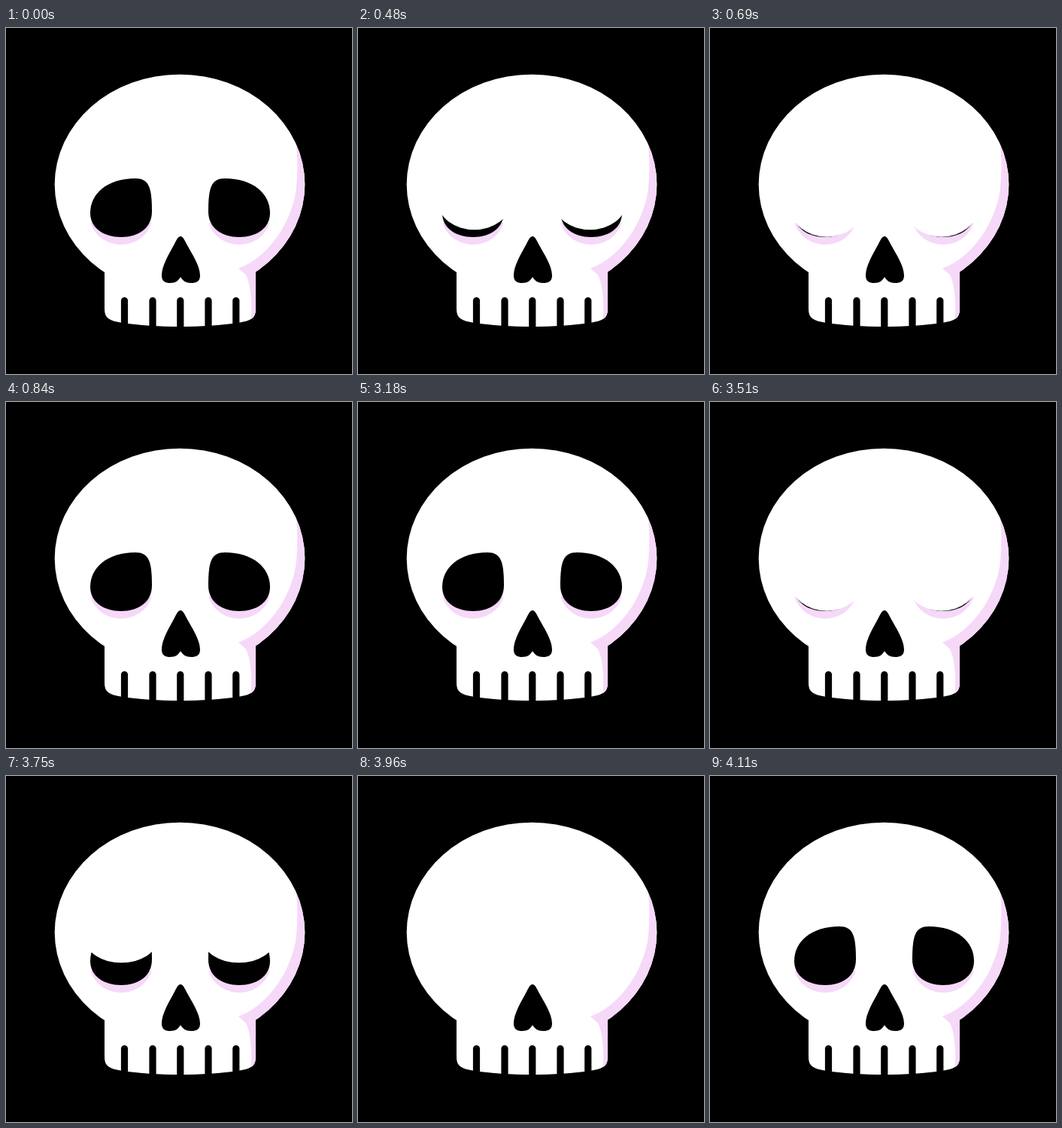
An HTML page with a canvas that plays this animation: 460 by 460 pixels, repeating every 4.5 s.

```html
<!DOCTYPE html>
<html lang="en">
<head>
<meta charset="utf-8">
<title>Blinking skull</title>
<style>
  html, body { margin: 0; width: 100%; height: 100%; overflow: hidden; background: #000; }
  canvas { display: block; width: 460px; height: 460px; }
</style>
</head>
<body>
<canvas id="stage" width="460" height="460"></canvas>
<script>
const ctx = document.getElementById('stage').getContext('2d');

const LOOP = 4500, STEP = 30;
const BONE = '#fff', SHADE = '#f6d8f9', DARK = '#000';

// Blink starts and phases, counted in steps of 30 ms
const BLINKS = [12, 106, 121.9];
const SHUT = 6, REOPEN = 9.6, DONE = 15.2;

const skull = new Path2D();
skull.ellipse(231, 208, 166.3, 146.3, 0, 0, Math.PI * 2);
skull.addPath(new Path2D(
  'M131 312 H332 V374 C332 386 325 389 311 391.5 C285 395.5 260 397 231.5 397 ' +
  'C203 397 178 395.5 152 391.5 C138 389 131 386 131 374 Z'));

const headShade = new Path2D(
  'M384.5 147 C388 167 388 190 386 212 C381 258 348 306 309 319.5 ' +
  'L332 340 L420 300 V147 Z');
const jawShade = new Path2D(
  'M309 319.5 C319.5 322 323.5 338 325 352 C326.5 368 326.5 379 325 390 H340 V315 Z');

const eye = new Path2D(
  'M112 246 C112 220 135 200 172 200 C190 200 194 212 194 244 ' +
  'C194 266 176 278 153 278 C130 278 112 266 112 246 Z');
const eyeShade = new Path2D('M112.5 259 C117.5 276 134 288 153 288 C172 288 188.5 276 193.5 259 Z');

const nose = new Path2D(
  'M232 277 C229 277 227 281 224 287 C217 300 207 316 207 329 ' +
  'C207 337 212 339 218 339 C226 339 229 336 232 331 ' +
  'C235 336 239 339 246 339 C253 339 258 337 258 329 ' +
  'C258 316 247 300 240 287 C237 281 235 277 232 277 Z');

const teeth = new Path2D();
for (const x of [157.5, 195, 231.8, 269, 305.8]) {
  teeth.roundRect(x - 4.6, 358, 9.2, 50, 4.6);
}

function fill(path, color) {
  ctx.fillStyle = color;
  ctx.fill(path);
}

function smooth(x) {
  x = Math.min(1, Math.max(0, x));
  return x * x * (3 - 2 * x);
}

// 0 is open, 1 is shut
function closure(step) {
  let p = 0;
  for (const start of BLINKS) {
    const s = step - start;
    p = Math.max(p, smooth(s / SHUT) - smooth((s - REOPEN) / (DONE - REOPEN)));
  }
  return p;
}

// White block with an elliptical lower edge that deepens as it falls
function lid(p) {
  const cx = 150.5 + 5.5 * p, low = 200 + 92 * p;
  const rx = 48, ry = 20 + 22 * p;
  const path = new Path2D();
  path.moveTo(cx - rx, 175);
  path.lineTo(cx + rx, 175);
  path.ellipse(cx, low - ry, rx, ry, 0, 0, Math.PI);
  path.closePath();
  return path;
}

function drawEye(p) {
  fill(eyeShade, SHADE);
  fill(eye, DARK);
  if (p > 0) fill(lid(p), BONE);
}

function draw(time) {
  const p = closure(Math.floor((time % LOOP) / STEP));
  ctx.fillStyle = DARK;
  ctx.fillRect(0, 0, 460, 460);
  fill(skull, BONE);

  ctx.save();
  ctx.clip(skull);
  fill(headShade, SHADE);
  fill(jawShade, SHADE);
  ctx.restore();

  drawEye(p);
  ctx.save();
  ctx.translate(463, 0);
  ctx.scale(-1, 1);
  drawEye(p);
  ctx.restore();

  fill(nose, DARK);
  fill(teeth, DARK);
}

let origin;
function tick(now) {
  origin ??= now;
  draw(Math.max(0, now - origin));
  requestAnimationFrame(tick);
}
draw(0);
requestAnimationFrame(tick);
</script>
</body>
</html>
```
